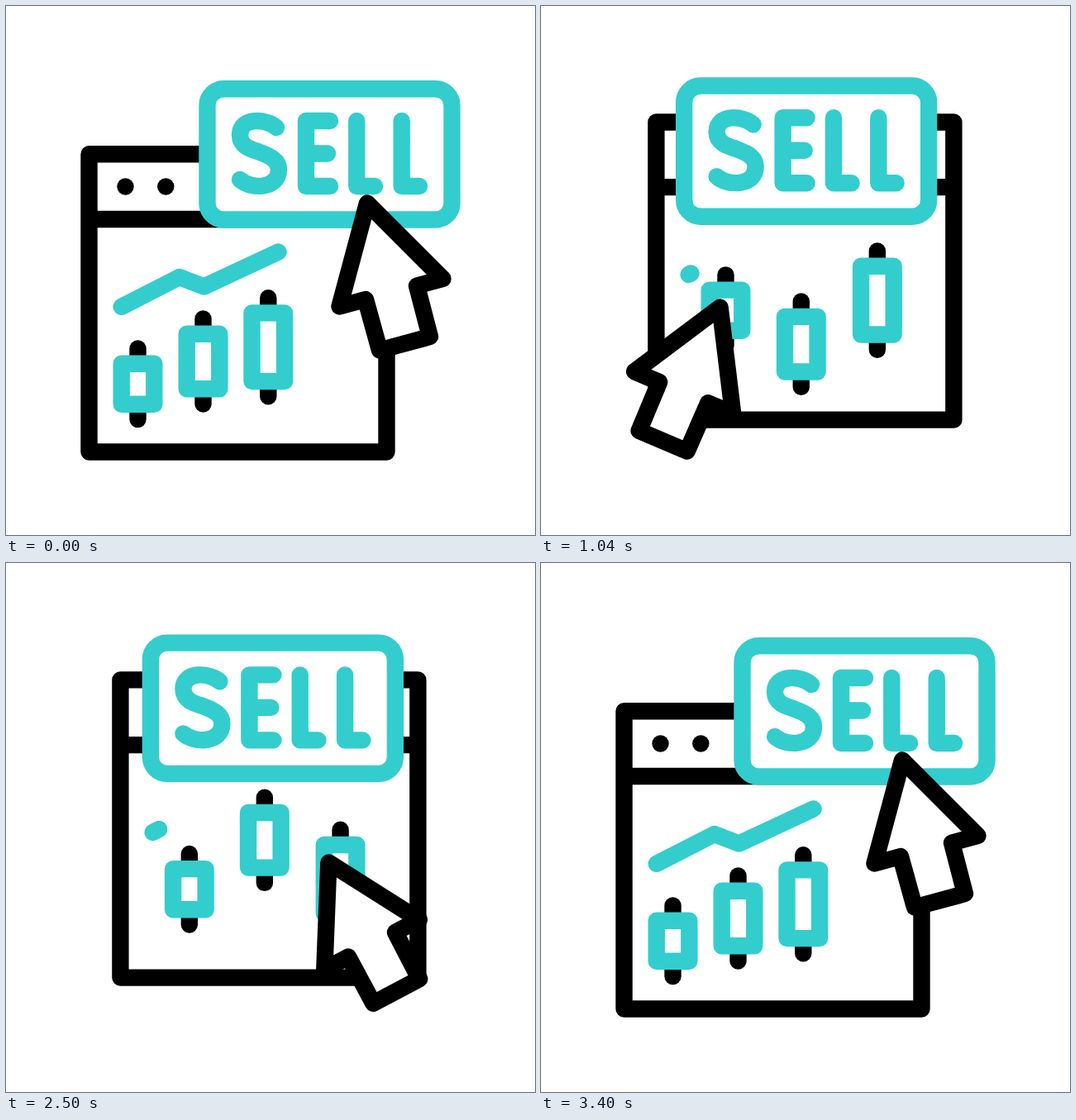
Animation of 640x640 px, one loop 3.6 s. Source, as an HTML page:

```html
<!DOCTYPE html>
<html lang="en">
<head>
<meta charset="utf-8">
<title>Sell</title>
<style>
  html, body { margin: 0; width: 100%; height: 100%; overflow: hidden; background: #fff; }
  svg { display: block; width: 100vw; height: 100vh; }
  .ink, .teal { fill: none; stroke: #000; stroke-width: 20.4; stroke-linecap: round; stroke-linejoin: round; }
  .teal { stroke: #33cdcd; }
  .solid { fill: #fff; }
</style>
</head>
<body>
<svg viewBox="0 0 640 640">
  <g id="panel">
    <path class="ink solid" d="M100.5 179.3H460.5V539.5H100.5ZM100.5 258H460.5"/>
    <circle cx="144.5" cy="218.5" r="10.2"/>
    <circle cx="193.3" cy="218.5" r="10.2"/>
    <path id="trend" class="teal" pathLength="1" d="M139.7 363.8L209.8 328L239.5 339.6L329.5 297.5"/>
  </g>
  <g id="candles"></g>
  <g id="sign" class="teal" role="img" aria-label="SELL">
    <rect class="solid" x="243.5" y="100.3" width="296" height="158.2" rx="20"/>
    <path d="M327 147C315 136 283 134 283 156C283 171 299 174 306 176.500C321 182 330 187 330 198C330 222 296 222 283 210"/>
    <path d="M392 139H363V218H392M363 178.500H389M424.300 139V218H446M478.700 139V218H500"/>
  </g>
  <path id="arrow" class="ink solid" d="M437 238.500L528.500 330L497 338.500L513 400L452 416.500L435 355L403.500 363.500Z"/>
</svg>
<script>
const LOOP = 3600, START = 20, END = 3400, SLIDE = 1250, SWING_AT = 1270, SWING = 880;
const NS = 'http://www.w3.org/2000/svg';
const $ = id => document.getElementById(id);

// x: centre, top/bottom: body, dx: shift, up/down: lift at the two chart states
const candles = [
  { x: 159.5, top: 432.7, bottom: 481.8, dx: 65, first: -90.5, second: -65.2 },
  { x: 238.5, top: 396.7, bottom: 463.3, dx: 77.5, first: -21.2, second: -98.7 },
  { x: 317.3, top: 371.4, bottom: 454.1, dx: 91, first: -57.5, second: -31.7 }
];
for (const c of candles) {
  c.node = document.createElementNS(NS, 'g');
  c.node.innerHTML =
    `<path class="ink" d="M${c.x} ${c.top - 18.3}V${c.bottom + 18.3}"/>` +
    `<rect class="teal solid" x="${c.x - 19.8}" y="${c.top}" width="39.600" height="${c.bottom - c.top}"/>`;
  $('candles').append(c.node);
}

function route(d) {
  const path = document.createElementNS(NS, 'path');
  path.setAttribute('d', d);
  const length = path.getTotalLength();
  return f => path.getPointAtLength(f * length);
}
const toLeft = route('M460 323.5C455 420 270 461 177 444.8');
const toRight = route('M177 444.8C250 479 365 470 426 441.5');
const toRest = route('M426 441.5C475 433 475 385 460 323.5');

// Cubic bezier easing with control points (.333, 0) and (x2, 1)
function ease(u, x2) {
  if (u <= 0) return 0;
  if (u >= 1) return 1;
  let lo = 0, hi = 1, s;
  for (let i = 0; i < 30; i++) {
    s = (lo + hi) / 2;
    const r = 1 - s;
    if (r * r * s + 3 * r * s * s * x2 + s * s * s < u) lo = s; else hi = s;
  }
  return s * s * (3 - 2 * s);
}

const move = (node, x, y) => node.setAttribute('transform', `translate(${x} ${y})`);

function draw(t) {
  const out = ease(Math.min(t - START, END - t) / SLIDE, 0.1);
  const swing = ease((t - SWING_AT) / SWING, 0.06);

  move($('panel'), 39.5 * out, -39.5 * out);
  move($('sign'), -71.5 * out, -3.8 * out);
  for (const c of candles)
    move(c.node, c.dx * out, out * (c.first + (c.second - c.first) * swing));

  $('trend').style.strokeDasharray = `${1 - out} 2`;
  $('trend').style.display = out > 0.9995 ? 'none' : '';

  const p = swing === 0 ? toLeft(out) : swing < 1 ? toRight(swing) : toRest(1 - out);
  const turn = out * (38.7 - 52 * swing);
  $('arrow').setAttribute('transform',
    `translate(${p.x} ${p.y}) rotate(${turn}) translate(-460 -323.5)`);
}

const begin = performance.now();
function tick() {
  draw((performance.now() - begin) % LOOP);
  requestAnimationFrame(tick);
}
tick();
</script>
</body>
</html>
```
